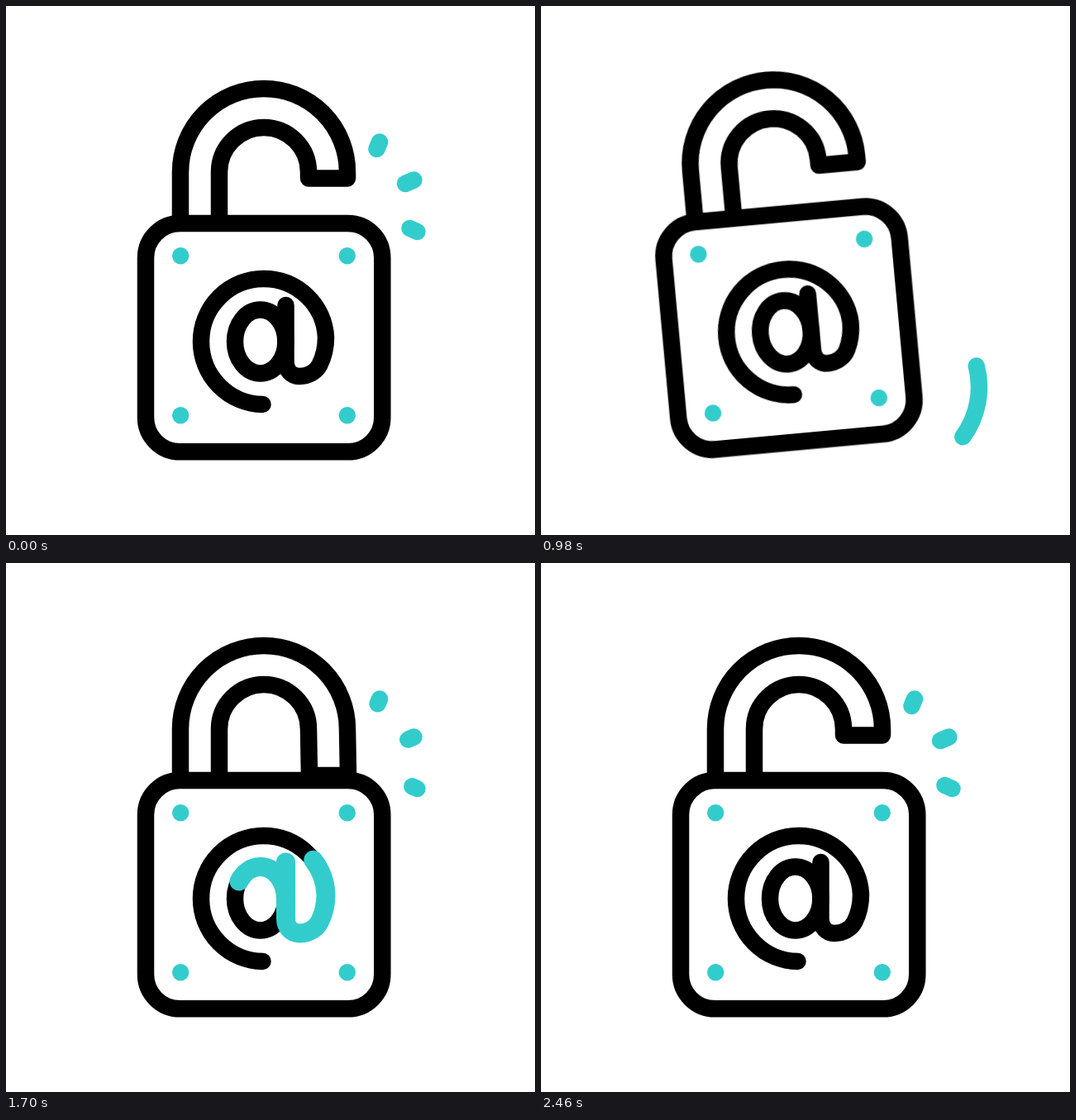
Write an HTML page that moves like this. It is 640 by 640 pixels and loops after 3200 ms.

```html
<!DOCTYPE html>
<html lang="en">
<head>
<meta charset="utf-8">
<title>Padlock</title>
<style>
  html, body { margin: 0; width: 100%; height: 100%; overflow: hidden; background: #fff; }
  svg { display: block; width: 100vw; height: 100vh; }

  .ink, .teal { fill: none; stroke-width: 20.5; stroke-linejoin: round; }
  .ink { stroke: #000; }
  .teal { stroke: #33cccc; }
  .round { stroke-linecap: round; }
  .dots { fill: #33cccc; }

  .lock, .shackle, .trim { animation: 3200ms linear infinite; }
  .lock { transform-origin: 180px 528px; animation-name: rock; }
  .shackle { animation-name: shackle; }

  /* A stroke is drawn from offset 101 to 0 and wiped from 0 to -101. */
  .trim { stroke-linecap: round; stroke-dasharray: 100 200; }
  .swing-up { animation-name: swing-up; }
  .swing-down { animation-name: swing-down; }
  .glow { stroke-width: 23; animation-name: glow; }
  .spark { animation-name: spark; }

  @keyframes rock {
    0%, 7.03% { transform: rotate(0deg); }
    17.5%, 25.06% { transform: rotate(-10deg); }
    36.84%, 61.34% { transform: rotate(0deg); }
    66.81% { transform: rotate(-10deg); }
    72.41%, 100% { transform: rotate(0deg); }
  }
  @keyframes shackle {
    0%, 36.88%, 71.44%, 100% {
      d: path("M211 262V201A101 101 0 0 1 413 201L413 208.5L366 208.5L366 201A54 54 0 0 0 258 201V262");
    }
    44.69%, 61.5% {
      d: path("M211 262V201A101 101 0 0 1 413 201L414 257L367 257L366 201A54 54 0 0 0 258 201V262");
    }
  }
  @keyframes swing-up {
    0%, 7.03% { stroke-dashoffset: 101; }
    18.16% { stroke-dashoffset: 0; }
    24.22%, 100% { stroke-dashoffset: -101; }
  }
  @keyframes swing-down {
    0%, 25.63% { stroke-dashoffset: 101; }
    38.28% { stroke-dashoffset: 0; }
    45.22%, 100% { stroke-dashoffset: -101; }
  }
  @keyframes glow {
    0%, 36.88% { stroke-dashoffset: 101; }
    47.03% { stroke-dashoffset: 0; }
    57.34%, 100% { stroke-dashoffset: -101; }
  }
  @keyframes spark {
    0%, 7.03% { stroke-dashoffset: 0; }
    12.5%, 45.3% { stroke-dashoffset: -101; }
    45.31% { stroke-dashoffset: 101; }
    51.25% { stroke-dashoffset: 0; }
    57.34%, 72.4% { stroke-dashoffset: -101; }
    72.41% { stroke-dashoffset: 101; }
    76.72%, 100% { stroke-dashoffset: 0; }
  }
</style>
</head>
<body>
<svg viewBox="0 0 640 640">
  <defs>
    <path id="tail" pathLength="100" d="M310.5 482A75.5 76 0 0 1 236 406A75.5 76 0 0 1 311.5 330A75.5 74 0 0 1 387 401C387 414 383.500 426 379.500 434C375 443 365 448 355 448C345 448 338.500 440 338.500 430V362"/>
    <ellipse id="bowl" pathLength="100" cx="307.7" cy="406" rx="30.700" ry="38.500"/>
  </defs>

  <g class="lock">
    <path class="ink shackle" d="M211 262V201A101 101 0 0 1 413 201L413 208.5L366 208.5L366 201A54 54 0 0 0 258 201V262"/>
    <rect class="ink" x="169" y="263" width="286.3" height="276.3" rx="41.500"/>
    <g class="dots">
      <circle cx="211.2" cy="302.3" r="10.2"/>
      <circle cx="412.8" cy="302.3" r="10.2"/>
      <circle cx="211.2" cy="495.3" r="10.2"/>
      <circle cx="412.8" cy="495.3" r="10.2"/>
    </g>
    <g class="ink round">
      <use href="#tail"/>
      <use href="#bowl"/>
    </g>
    <use class="teal trim glow" href="#tail"/>
    <use class="teal trim glow" href="#bowl"/>
  </g>

  <path class="teal trim swing-up" pathLength="100" d="M291.8 529.2A103 103 0 0 1 107.700 548.600"/>
  <path class="teal trim swing-down" pathLength="100" d="M526.8 435.5A102 102 0 0 1 384.900 553.400"/>

  <path class="teal trim spark" pathLength="100" d="M448.5 173L452 164.500"/>
  <path class="teal trim spark" pathLength="100" d="M483 215L493.500 210.500"/>
  <path class="teal trim spark" pathLength="100" d="M488.5 269L497.500 273"/>
</svg>
</body>
</html>
```
